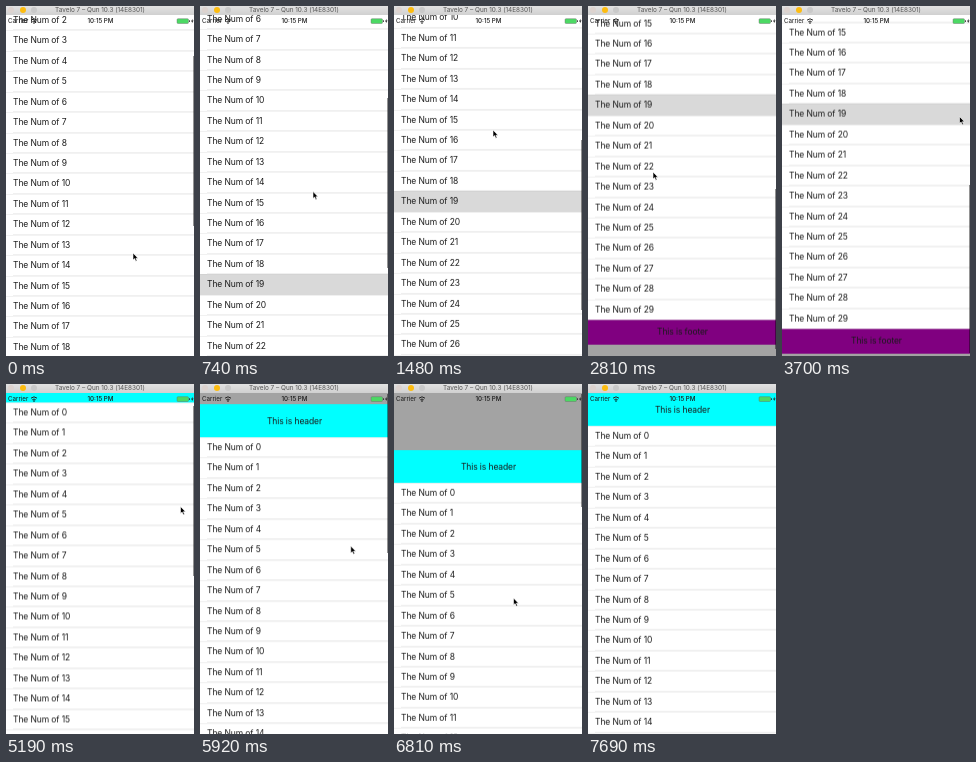
An HTML page for the animation above (7990 ms loop, 188 px wide and 350 px high).

```html
<!DOCTYPE html>
<html lang="en">
<head>
<meta charset="utf-8">
<title>List with header and footer</title>
<style>
  html, body { margin: 0; width: 100%; height: 100%; overflow: hidden; }
  body { position: relative; background: #a3a3a3; color: #1a1a1a; font: 8.5px/20.45px Inter, "Liberation Sans", sans-serif; }
  body > *, .row::after { position: absolute; }
  #list { left: 0; top: 0; width: 188px; letter-spacing: -.012em; white-space: nowrap; will-change: transform; }
  .row { position: relative; height: 20.45px; padding-left: 7px; background: #fff; }
  .row::after { content: ""; left: 7px; right: 0; bottom: 0; height: 1px; background: #ededed; }
  .row.on { background: #d9d9d9; }
  .row.on::after, .row.last::after { display: none; }
  .band { text-align: center; text-indent: 1px; }
  .head { height: 33px; line-height: 34px; background: #0ff; }
  .foot { height: 25px; line-height: 25px; background: #800080; }
  #bar { left: 1px; top: 10px; width: 187px; height: 10px; font-size: 6.2px; line-height: 10px; }
  #bar b { position: absolute; left: 0; right: 0; text-align: center; font-weight: 500; }
  #bar svg { position: absolute; left: 0; top: 0; }
  #thumb { left: 187px; width: 1px; background: rgba(0, 0, 0, .42); }
  #title { left: 0; top: 0; width: 188px; height: 9px; background: linear-gradient(#e2e2e2, #d0d0d0); color: #555; font-size: 6.4px; line-height: 9px; text-align: center; }
  #title i { position: absolute; top: 1px; width: 6px; height: 6px; border-radius: 50%; }
  #arrow { left: 0; top: 0; overflow: visible; }
</style>
</head>
<body>
<div id="list"></div>
<div id="thumb"></div>
<div id="bar">
  <span style="margin-left:1px">Carrier</span><b>10:15 PM</b>
  <svg width="187" height="10">
    <path d="M24 4.2q3-2.8 6 0M25.3 5.8q1.7-1.6 3.4 0" fill="none" stroke="#222"/>
    <circle cx="27" cy="7" r=".8"/>
    <rect x="170" y="2.7" width="11.5" height="4.8" rx="1" fill="#4cd964" stroke="#666" stroke-width=".4"/>
    <path d="M182.2 4.2h.8v1.8h-.8zM185.6 2.8l-1.6 2.6h1.2l-.4 2 1.8-2.8h-1.2z" fill="#222"/>
  </svg>
</div>
<div id="title">
  <i style="left:2px;background:#ddd3cf"></i><i style="left:13.5px;background:#fdbc10"></i><i style="left:25px;background:#c9c9c9"></i>
  Tavelo 7 – Qun 10.3 (14E8301)
</div>
<svg id="arrow" width="6" height="9">
  <path d="M0 0V7L1.6 5.6 2.8 8.3 4 7.8 2.9 5.2H5Z" fill="#000" stroke="#fff" stroke-width=".6"/>
</svg>
<script>
const LOOP = 7990, STEP = 147.8, TOP = 9, BOTTOM = 350, ROW = 20.45, COUNT = 30;
const CONTENT = 33 + ROW * COUNT + 25, VIEW = BOTTOM - TOP, THUMB = 170;

// Step, top of the list, pointer x and y
const poses = [
  [0, -69.8, 127, 247],
  [10, -235.9, 99, 124],
  [19, -332.2, 65, 166],
  [25, -323.2, 177.5, 110.5],
  [35, -14.4, 174.5, 122.5],
  [46, 66, 119.5, 214],
  [50, TOP, 196, 320]
];

const smooth = k => k * k * (3 - 2 * k);

function poseAt(step) {
  const i = poses.findIndex(p => p[0] > step);
  if (i < 0) return poses[poses.length - 1];
  const a = poses[i - 1], b = poses[i];
  const k = smooth((step - a[0]) / (b[0] - a[0]));
  return a.map((v, j) => v + (b[j] - v) * k);
}

const $ = id => document.getElementById(id);
const list = $("list"), thumb = $("thumb"), arrow = $("arrow");

function add(cls, text) {
  const el = document.createElement("div");
  el.className = cls;
  el.textContent = text;
  list.append(el);
}
add("band head", "This is header");
for (let n = 0; n < COUNT; n++)
  add("row" + (n === 19 ? " on" : "") + (n === COUNT - 1 ? " last" : ""), "The Num of " + n);
add("band foot", "This is footer");

function draw(step) {
  const [, y, px, py] = poseAt(step);
  list.style.transform = `translateY(${y}px)`;
  arrow.style.transform = `translate(${px}px, ${py}px)`;

  // The thumb shrinks while the list is pulled past an end
  const over = Math.max(0, y - TOP, BOTTOM - y - CONTENT);
  const size = THUMB - over;
  const top = TOP + 1 + (TOP - y) * VIEW / CONTENT;
  thumb.style.top = Math.min(Math.max(top, TOP + 1), BOTTOM - 1 - size) + "px";
  thumb.style.height = size + "px";
  thumb.style.opacity = y === TOP ? 0 : 1;
}

const start = performance.now();
function frame() {
  draw(Math.floor((performance.now() - start) % LOOP / STEP));
  requestAnimationFrame(frame);
}
frame();
</script>
</body>
</html>
```
